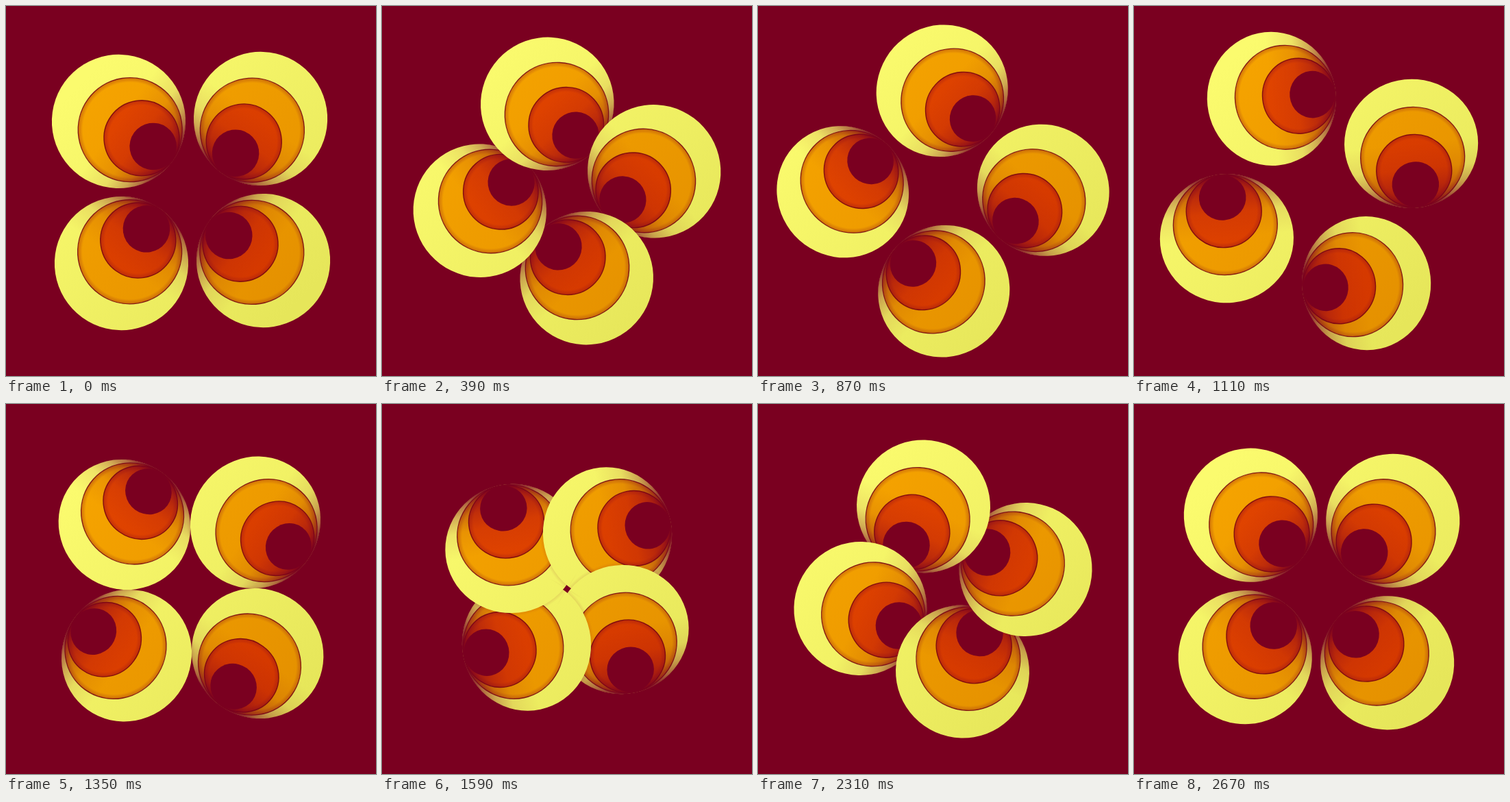
These frames come from a looping animation (540 px wide and 540 px high, 2.7 s). An HTML page with a canvas:

```html
<!DOCTYPE html>
<html lang="en">
<head>
<meta charset="utf-8">
<title>Four petals</title>
<style>
  html, body { margin: 0; width: 100%; height: 100%; overflow: hidden; background: #7a0020; }
  canvas { display: block; width: 540px; height: 540px; }
</style>
</head>
<body>
<canvas id="stage" width="540" height="540"></canvas>
<script>
const SIZE = 540, MID = 270, LOOP = 2700, STEP = 30, TAU = Math.PI * 2;
const BG = '#7a0020';
const SHIFT = 20.7; // distance between neighbouring ring centres
const ctx = document.getElementById('stage').getContext('2d');
const layer = document.createElement('canvas');
layer.width = layer.height = SIZE;
const pen = layer.getContext('2d');

const bg = a => `rgba(122,0,32,${a})`;
const rad = d => d * Math.PI / 180;

function shade(gradient, stops) {
  stops.forEach(([at, color]) => gradient.addColorStop(at, color));
  return gradient;
}

// Light falls from the upper left across the whole stage.
const lit = (from, to) =>
  shade(ctx.createLinearGradient(110, 110, 430, 430), [[0, from], [1, to]]);

const halo = (u, r0, r1, a0, a1) =>
  shade(ctx.createRadialGradient(u, 0, r0, u, 0, r1), [[0, bg(a0)], [1, bg(a1)]]);

// The low side of a petal sinks into the background.
const fade = shade(ctx.createLinearGradient(0, 0, 98, 0),
  [[0, bg(0)], [0.4, bg(0.09)], [0.65, bg(0.31)], [0.82, bg(0.56)], [1, bg(1)]]);

const rings = [
  { r: 97.6, fill: lit('#fbfb6e', '#e6e65a') },
  { r: 76, fill: lit('#f6a400', '#e49000') },
  { r: 55, fill: lit('#e24600', '#d23600') },
  { r: 34.3, fill: BG }
];

// Petals are drawn along their own axis; ring colours stay fixed to the stage.
function petal(g, { x, y, dir, squash }) {
  const R = rings[0].r;
  const local = () => {
    g.setTransform(1, 0, 0, 1, x, y);
    g.rotate(dir);
    g.scale(squash, 1);
  };
  const circle = (u, r) => {
    local();
    g.beginPath();
    g.arc(u, 0, r, 0, TAU);
  };
  const fill = style => {
    g.fillStyle = style;
    g.fill();
  };

  circle(0, R + 5);
  fill(halo(0, R - 1, R + 5, 0.12, 0));
  rings.forEach((ring, i) => {
    const u = SHIFT * i;
    circle(u, ring.r);
    g.resetTransform();
    fill(ring.fill);
    if (i === 1 || i === 2) {
      local();
      fill(halo(u, ring.r - 7, ring.r, 0, 0.3));
      g.lineWidth = 1.4;
      g.strokeStyle = 'rgba(116,0,16,.85)';
      g.stroke();
    }
  });
  circle(0, R + 0.3);
  fill(fade);
  g.resetTransform();
}

// The eye of each petal slides along a line while the group makes half a turn
// and the petal one and a half turns around its eye.
function pose(t) {
  const c = Math.cos(TAU * t), s = Math.sin(TAU * t);
  const slide = 77.5 + 77 * c + 9.7 * s;
  const ex = -62.5 + 0.8255 * slide, ey = -142.5 + 0.5645 * slide;
  const squash = 1 - 0.02 * (1 - c);
  const arm = 3 * SHIFT * squash;
  return [0, 1, 2, 3].map(k => {
    const turn = rad(90 * k - 180 * t), dir = rad(126 + 90 * k - 540 * t);
    const tc = Math.cos(turn), ts = Math.sin(turn);
    return {
      x: MID + ex * tc - ey * ts - arm * Math.cos(dir),
      y: MID + ex * ts + ey * tc - arm * Math.sin(dir),
      dir, squash
    };
  });
}

// Tilted petals cross at the middle, so their order differs in each eighth.
function interleave(petals) {
  const half = rad(22.5);
  for (let m = 0; m < 8; m++) {
    const mid = petals[0].dir + half + rad(45 * m);
    const height = p => -Math.cos(mid - p.dir);
    pen.fillStyle = BG;
    pen.fillRect(0, 0, SIZE, SIZE);
    [...petals].sort((p, q) => height(p) - height(q)).forEach(p => petal(pen, p));

    const ox = MID - Math.cos(mid) * 2, oy = MID - Math.sin(mid) * 2;
    ctx.save();
    ctx.beginPath();
    ctx.moveTo(ox, oy);
    ctx.arc(ox, oy, 420, mid - half, mid + half);
    ctx.clip();
    ctx.drawImage(layer, 0, 0);
    ctx.restore();
  }
}

function draw(now) {
  const t = Math.floor((now + 2) / STEP) * STEP % LOOP / LOOP;
  const petals = pose(t);
  ctx.fillStyle = BG;
  ctx.fillRect(0, 0, SIZE, SIZE);
  if (Math.hypot(petals[0].x - MID, petals[0].y - MID) < 140) interleave(petals);
  else petals.forEach(p => petal(ctx, p));
  requestAnimationFrame(draw);
}

draw(performance.now());
</script>
</body>
</html>
```
